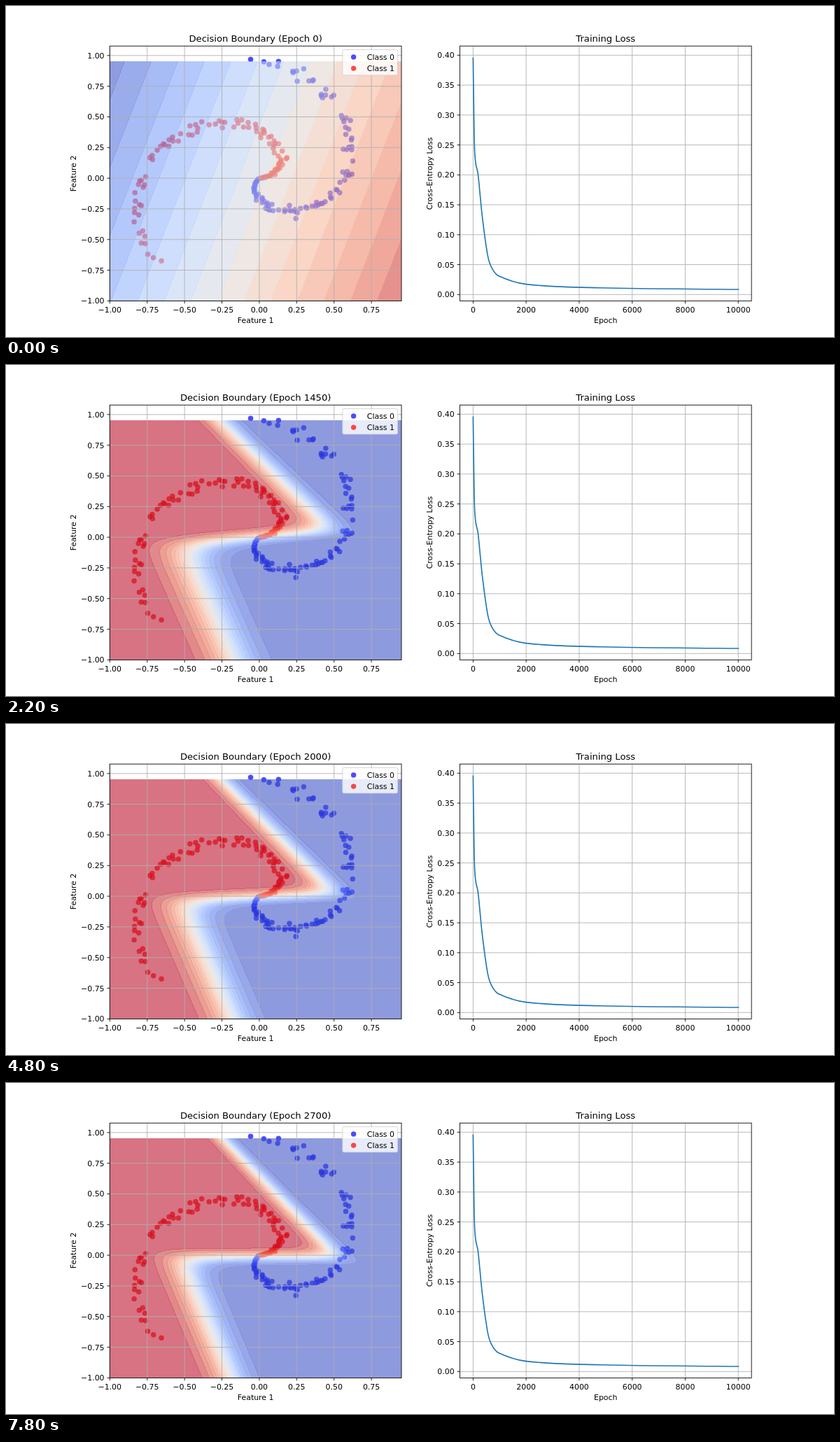
Recreate the animation shown at these times as an HTML page with a canvas. Size 1183 by 473 pixels, loop 8000 ms.

```html
<!DOCTYPE html>
<html lang="en">
<head>
<meta charset="utf-8">
<title>Decision Boundary</title>
<style>
html, body { margin: 0; width: 100%; height: 100%; overflow: hidden; background: #fff; }
canvas, svg { position: absolute; left: 0; top: 0; width: 1183px; height: 473px; }
text { font: 10.95px "DejaVu Sans", sans-serif; fill: #000; }
.title { font-size: 13.14px; }
.grid { stroke: #b0b0b0; stroke-width: .88; }
.axis { stroke: #000; stroke-width: .88; fill: none; }
</style>
</head>
<body>
<canvas id="plot" width="1183" height="473"></canvas>
<svg viewBox="0 0 1183 473"><g id="chart" transform="translate(.4 .4)"></g></svg>
<script>
const STEP_MS = 200, STEPS = 40;
const TOP = 56.8, BOTTOM = 421;
const chart = document.getElementById('chart');
const ctx = document.getElementById('plot').getContext('2d');
const range = (from, step, n) => Array.from({ length: n }, (_, i) => from + step * i);

// ---------- static chart parts ----------
function add(tag, attrs, text) {
  const el = document.createElementNS('http://www.w3.org/2000/svg', tag);
  for (const k in attrs) el.setAttribute(k, attrs[k]);
  if (text !== undefined) el.textContent = text;
  return chart.appendChild(el);
}
const label = (x, y, text, anchor = 'middle', cls = '') =>
  add('text', { x, y, 'text-anchor': anchor, class: cls }, text);
const line = (cls, x1, y1, x2, y2) => add('line', { class: cls, x1, y1, x2, y2 });
const signed = v => (v < 0 ? '\u2212' : '') + Math.abs(v).toFixed(2);

function axes({ left, right, xTicks, yTicks, px, py, xText, xName, yName, yNameX, curve }) {
  const mid = (left + right) / 2;
  for (const v of xTicks) line('grid', px(v), TOP, px(v), BOTTOM);
  for (const v of yTicks) line('grid', left, py(v), right, py(v));
  if (curve) add('path', { d: curve, fill: 'none', stroke: '#1f77b4', 'stroke-width': 1.64, 'stroke-linecap': 'square' });
  add('rect', { class: 'axis', x: left, y: TOP, width: right - left, height: BOTTOM - TOP });
  for (const v of xTicks) {
    line('axis', px(v), BOTTOM, px(v), BOTTOM + 3.8);
    label(px(v), 437.4, xText(v));
  }
  for (const v of yTicks) {
    line('axis', left - 3.8, py(v), left, py(v));
    label(left - 7.7, py(v) + 4, signed(v), 'end');
  }
  label(mid, 452.5, xName);
  label(0, 0, yName).setAttribute('transform', `translate(${yNameX} 239) rotate(-90)`);
  return label(mid, 50.2, '', 'middle', 'title');
}

const mapX = v => 361.5 + 213.6 * v, mapY = v => 245.7 - 175.3 * v;
const title = axes({
  left: 147.9, right: 564.6,
  xTicks: range(-1, .25, 8), yTicks: range(-1, .25, 9),
  px: mapX, py: mapY, xText: signed,
  xName: 'Feature 1', yName: 'Feature 2', yNameX: 99.7
});

// smooth path through a few key points
function spline(pts) {
  const slope = (p, q) => (q[1] - p[1]) / (q[0] - p[0]);
  let d = `M${pts[0]}`;
  for (let i = 0; i < pts.length - 1; i++) {
    const a = pts[i - 1] || pts[i], b = pts[i], c = pts[i + 1], e = pts[i + 2] || c;
    const t = (c[0] - b[0]) / 3;
    d += `C${b[0] + t},${b[1] + t * slope(a, c)} ${c[0] - t},${c[1] - t * slope(b, e)} ${c}`;
  }
  return d;
}
const loss = [[667, 74], [668.3, 170], [669.2, 207], [671, 226], [674, 240], [680, 300],
  [688, 357], [694, 374.5], [703, 385], [743, 397.2], [850, 402.4], [1046, 404.6]];
axes({
  left: 648, right: 1064.7,
  xTicks: range(0, 2000, 6), yTicks: range(0, .05, 9),
  px: v => 667 + v * .03788, py: v => 411.9 - v * 855, xText: String,
  xName: 'Epoch', yName: 'Cross-Entropy Loss', yNameX: 608.4, curve: spline(loss)
}).textContent = 'Training Loss';

add('rect', { x: 480.4, y: 62.1, width: 78.8, height: 36.4, rx: 2.2, fill: '#fff', 'fill-opacity': .8, stroke: '#ccc', 'stroke-opacity': .8 });
['blue', 'red'].forEach((fill, i) => {
  add('circle', { cx: 496.2, cy: 72.5 + 16.2 * i, r: 3.7, fill, 'fill-opacity': .7 });
  label(515.4, 76.2 + 16.1 * i, 'Class ' + i, 'start');
});

// ---------- two spiral arms of noisy samples ----------
let seed = 11;
const rand = () => (seed = seed * 16807 % 2147483647) / 2147483647;
const noise = () => (rand() + rand() + rand() - 1.5) * 2;

const arm = phase => range(.01, .01, 97).map(r => {
  const t = 4 * r + phase + .1 * noise();
  return [mapX(r * Math.cos(t)) + .4, mapY(r * Math.sin(t)) + .4];
});
const samples = [['rgba(0,0,255,.7)', arm(4)], ['rgba(255,0,0,.7)', arm(0)]];

// ---------- filled contours ----------
const ramp = [[59, 76, 192], [98, 130, 234], [141, 176, 254], [184, 208, 249], [221, 221, 221],
  [245, 196, 173], [244, 154, 123], [222, 96, 77], [180, 4, 38]];
function coolwarm(t) {
  const i = Math.floor(t * 8), f = t * 8 - i;
  return ramp[i].map((c, k) => c + (ramp[i + 1][k] - c) * f);
}

const X0 = 148, Y0 = 79, W = 417, H = 342;
const layer = document.createElement('canvas');
layer.width = W;
layer.height = H;
const layerCtx = layer.getContext('2d');
const image = layerCtx.createImageData(W, H);
const level = new Float32Array(W * H);

const softMax = (a, b, t) => Math.max(a, b) + t * Math.log1p(Math.exp(-Math.abs(a - b) / t));
const softMin = (a, b, t) => -softMax(-a, -b, t);

// red = left of the lower slope, or above the middle and left of the upper slope
function trained(epoch) {
  const q = Math.log(epoch / 1250) / Math.log(2700 / 1250);
  const mix = (a, b) => a + (b - a) * q;
  const low = mix(326, 321), lowSlope = mix(.45, .42), lowHalf = mix(58, 41);
  const high = mix(304, 309), highSlope = mix(1.03, .97), highHalf = mix(33, 21);
  const flat = mix(246, 248), tilt = mix(-.1, 0), flatHalf = mix(12.5, 12);
  const tip = mix(2, 1.5), notch = mix(2.1, 1.7);
  const edge = Math.log(19);
  return (x, y) => {
    const a = (low + (y - 421) * lowSlope - x) / lowHalf * edge;
    const b = (high + (y - 79) * highSlope - x) / (highHalf + .04 * (y - 79)) * edge;
    const c = (flat + (x - 340) * tilt - y) / flatHalf * edge;
    return 20 / (1 + Math.exp(-softMax(a, softMin(b, c, tip), notch)));
  };
}
const untrained = (x, y) => (x - .39 * (421 - y) - 36) / 38 + 1;

function paintField(epoch) {
  const field = epoch ? trained(epoch) : untrained;
  const count = epoch ? 20 : 16;
  const colors = range(0, 1, count).map(k => coolwarm((k + .5) / count));
  const band = v => Math.max(0, Math.min(count - 1, Math.floor(v)));
  for (let y = 0, i = 0; y < H; y++)
    for (let x = 0; x < W; x++, i++) level[i] = field(X0 + x, Y0 + y);
  for (let i = 0; i < W * H; i++) {
    const v = level[i], k = band(v);
    const right = i % W < W - 1 ? level[i + 1] : v;
    const down = i + W < W * H ? level[i + W] : v;
    // neighbouring bands overlap slightly, leaving a faint seam
    const seam = (band(right) !== k || band(down) !== k) &&
      Math.abs(right - v) + Math.abs(down - v) < .4;
    image.data.set(colors[k], i * 4);
    image.data[i * 4 + 3] = seam ? 176 : 153;
  }
  layerCtx.putImageData(image, 0, 0);
}

function draw(step) {
  const epoch = step ? 950 + 50 * (step - 1 - Math.floor(step / 12)) : 0;
  title.textContent = `Decision Boundary (Epoch ${epoch})`;
  ctx.clearRect(0, 0, 1183, 473);
  for (const [color, pts] of samples) {
    ctx.fillStyle = color;
    for (const [x, y] of pts) {
      ctx.beginPath();
      ctx.arc(x, y, 3.75, 0, 7);
      ctx.fill();
    }
  }
  paintField(epoch);
  ctx.drawImage(layer, X0, Y0);
}

let shown = -1;
const start = performance.now();
function tick() {
  const step = Math.floor((performance.now() - start) / STEP_MS) % STEPS;
  if (step !== shown) draw(shown = step);
  requestAnimationFrame(tick);
}
tick();
</script>
</body>
</html>
```
